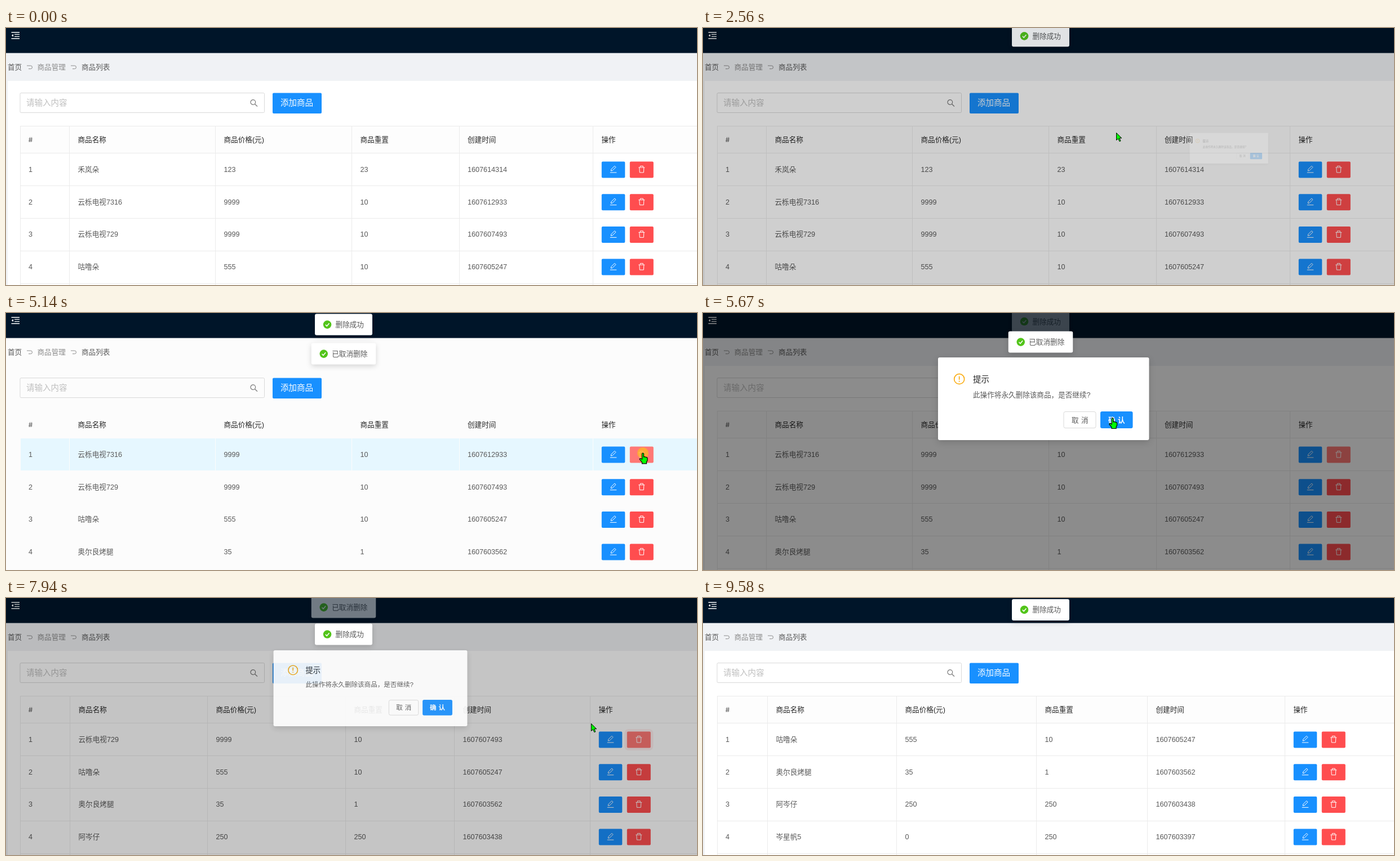
Recreate the animation shown at these times as an HTML page. Size 1226 by 457 pixels, loop 9.7 s.

```html
<!DOCTYPE html>
<html lang="zh">
<head>
<meta charset="utf-8">
<title>商品列表</title>
<style>
html, body { margin: 0; width: 100%; height: 100%; overflow: hidden; background: #f0f2f5; }
svg { display: block; width: 1226px; height: 457px; }
text { font: 12.6px "Liberation Sans", "Noto Sans CJK SC", "Noto Sans CJK", sans-serif; fill: #595959; white-space: pre; }
.big { font-size: 14.5px; }
.dark { fill: #262626; }
.soft { fill: #8c8c8c; }
.hint { fill: #bfbfbf; }
.white { fill: #fff; }
.wide { letter-spacing: 4.3px; }
.bold { font-weight: bold; }
.line { fill: none; stroke-width: 1; }
.grid { fill: none; stroke: #ebebeb; }
.icon { fill: none; stroke: #fff; stroke-width: 1; }
.bg { fill: #f0f2f5; }
.main { fill: #fff; }
.wash .bg, .wash .main, .wash .head { fill: #fcfcfc; }
.wash .grid { stroke: #fcfcfc; }
.head { fill: #fdfdfd; }
.notice { filter: drop-shadow(0 3px 5px rgba(0,0,0,.16)); }
#modal { filter: drop-shadow(0 4px 6px rgba(0,0,0,.15)); }
</style>
</head>
<body>
<svg id="stage" viewBox="0 0 1226 457">
  <rect class="bg" width="1226" height="457"/>
  <rect width="1226" height="44.5" fill="#001529"/>
  <g stroke="#fff" stroke-width="1.4" fill="#fff">
    <path d="M9.5 7.7H24M15 11.4H24M15 15.1H24M9.5 18.8H24"/>
    <path d="M13 10.8V15.7L9.8 13.2Z" stroke="none"/>
  </g>
  <text x="3" y="73.5">首页</text>
  <text x="55.5" y="73.5" class="soft">商品管理</text>
  <text x="134" y="73.5">商品列表</text>
  <path class="line" stroke="#8c8c8c" d="M37 67H43.5a3 2.8 0 0 1 0 5.6H40M115 67H121.500a3 2.8 0 0 1 0 5.600H118"/>
  <rect class="main" x="3" y="94" width="1223" height="363"/>
  <rect x="25" y="115.500" width="433.500" height="35" rx="2" fill="none" stroke="#d9d9d9"/>
  <text x="36" y="138" class="big hint">请输入内容</text>
  <path class="line" stroke="#7a7a7a" style="stroke-width:1.2" d="M434 132a4.300 4.300 0 1 0 8.600 0a4.300 4.300 0 1 0 -8.600 0M441.500 135.200L446 139.500"/>
  <rect x="473" y="115.500" width="87" height="36.500" rx="2" fill="#1890ff"/>
  <text x="487" y="138" class="big white">添加商品</text>
  <g id="tables"></g>
  <rect id="mask" width="1226" height="457"/>
  <g id="modal">
    <rect x="417" y="79" width="374.400" height="147" rx="3" fill="#fff"/>
    <g fill="none" stroke="#faad14" stroke-width="1.700">
      <circle cx="454.700" cy="117.400" r="9"/>
      <path d="M454.700 112.400V118.800M454.700 120.600V122.400"/>
    </g>
    <text x="479" y="123" class="big dark">提示</text>
    <text x="479" y="149.700">此操作将永久删除该商品，是否继续?</text>
    <rect x="640" y="175.500" width="57" height="29" rx="3" fill="#fff" stroke="#d9d9d9"/>
    <text x="654" y="194.700" class="wide">取消</text>
    <rect x="705" y="175" width="57.500" height="30" rx="3" fill="#1890ff"/>
    <text x="719" y="194.700" class="wide white bold">确认</text>
  </g>
  <g id="notices"></g>
  <g id="cursor">
    <circle id="press" r="10" fill="#ffb428" fill-opacity=".8"/>
    <path id="arrow" fill="#0f0" stroke="#000" d="M.5 .5V13.500L3.600 10.800L6 15.700L8 14.800L5.800 9.800H9.800Z"/>
    <path id="hand" fill="#0f0" stroke="#000" stroke-width="1.200" d="M-1.500 11V1.500a1.500 1.500 0 0 1 3 0V7q1.500 -1.200 2.500 .3q1.800 -.9 2.300 .7q1.700 -.5 1.700 1.300V13l-1.500 3v2.800h-8V16.500L-5.500 11.500q-.5 -2 1.200 -2z"/>
  </g>
</svg>
<script>
const LOOP = 9700;
const $ = id => document.getElementById(id);
const show = (el, on) => { el.style.display = on ? '' : 'none'; };
const ramp = (t, a, b) => Math.min(1, Math.max(0, (t - a) / (b - a)));
const mix = (a, b, p) => a + (b - a) * p;

function bezier(x1, y1, x2, y2) {
  const at = (a, b, u) => 3 * (1 - u) ** 2 * u * a + 3 * (1 - u) * u * u * b + u ** 3;
  return x => {
    let lo = 0, hi = 1;
    for (let i = 0; i < 22; i++) {
      const mid = (lo + hi) / 2;
      if (at(x1, x2, mid) < x) lo = mid; else hi = mid;
    }
    return x <= 0 ? 0 : x >= 1 ? 1 : at(y1, y2, lo);
  };
}
const outCirc = bezier(.08, .82, .17, 1);
const inOutCirc = bezier(.78, .14, .15, .86);
const smooth = bezier(.35, .1, .4, 1);

const goods = [
  ['禾岚朵', 123, 23, 1607614314],
  ['云栎电视7316', 9999, 10, 1607612933],
  ['云栎电视729', 9999, 10, 1607607493],
  ['咕噜朵', 555, 10, 1607605247],
  ['奥尔良烤腿', 35, 1, 1607603562],
  ['阿岑仔', 250, 250, 1607603438],
  ['岑星帆5', 0, 250, 1607603397]
];
const titles = ['#', '商品名称', '商品价格(元)', '商品重置', '创建时间', '操作'];
const wideCols = [25, 112.5, 371.5, 613.5, 804, 1041.5];
const layouts = [wideCols, wideCols,
  [25, 113.5, 357.5, 602.5, 795.5, 1036.5],
  [25, 114.5, 343.5, 591.5, 788.5, 1032.5]];
const listTimes = [0, 2660, 6340, 9240];

const label = (x, y, s, cls = '') => `<text x="${x}" y="${y}" class="${cls}">${s}</text>`;

function buttons(x, y, first) {
  const id = first ? 'class="del"' : '';
  return `<rect x="${x}" y="${y}" width="41.5" height="29" rx="2" fill="#1890ff"/>
    <path class="icon" d="M${x + 15} ${y + 19.5}h11.500M${x + 16.5} ${y + 16.5}l.5 -2.700l6 -6l2.200 2.200l-6 6z"/>
    ${first ? `<rect class="wave" x="${x + 50}" y="${y}" width="42" height="29" rx="3" fill="none" stroke="#ffb8b8"/>` : ''}
    <rect ${id} x="${x + 50}" y="${y}" width="42" height="29" rx="2" fill="#ff4d4f"/>
    <path class="icon" d="M${x + 65.5} ${y + 10.5}h11M${x + 68.5} ${y + 10}v-2h5v2M${x + 67} ${y + 10.5}l.5 9h7l.5 -9"/>`;
}

function table(cols, offset) {
  const tops = [223, 280.7, 338.4, 396.1];
  let s = '<rect class="head" x="25" y="175" width="1201" height="48"/>' +
    '<rect class="hover" x="25" y="223" width="1201" height="57.5" fill="#e6f7ff"/>';
  s += `<path class="grid" d="M25 174.500H1226M25 222.500H1226${tops.map(y => `M25 ${Math.round(y + 57.4) + .5}H1226`).join('')}` +
    cols.map(x => `M${Math.floor(x) + .5} 174V457`).join('') + '"/>';
  s += titles.map((h, i) => label(cols[i] + 15, 203, h, 'dark')).join('');
  tops.forEach((y, r) => {
    s += [r + 1, ...goods[r + offset]].map((v, i) => label(cols[i] + 15, y + 33, v)).join('');
    s += buttons(cols[5] + 15.3, y + 14.5, r === 0);
  });
  return `<g>${s}</g>`;
}
$('tables').innerHTML = layouts.map(table).join('');
const tables = [...$('tables').children];

// opening time, closing time, x of the click it grows from
const modals = [[1150, 2445, 1128], [3912, 4800, 1128], [5230, 6257, 1128], [7840, 9080, 1123]];
const messages = [[2500, '删除成功'], [4795, '已取消删除'], [6285, '删除成功'], [9130, '删除成功']];
$('notices').innerHTML = messages.map(([, s]) => {
  const w = 51.5 + 12.6 * s.length, x = 599 - w / 2;
  return `<g class="notice"><rect x="${x}" width="${w}" height="38" rx="3" fill="#fff"/>
    <circle cx="${x + 22}" cy="19" r="7.300" fill="#52c41a"/>
    <path class="icon" style="stroke-width:1.500" d="M${x + 18.8} 19.200l2.400 2.500l4.200 -5"/>
    ${label(x + 36.5, 23.5, s)}</g>`;
}).join('');
const notices = [...$('notices').children];

// each leg: start, end, target x, target y
const legs = [
  [550, 1000, 1128, 250], [1190, 1510, 804, 170], [1545, 1740, 733, 186],
  [2950, 3590, 1130, 250], [3930, 4050, 1030, 243, 1], [4050, 4630, 667, 190],
  [4820, 5070, 1130, 249], [5280, 5720, 722, 186], [6740, 7690, 1127, 250],
  [7850, 7940, 1038, 223, 1], [7940, 8710, 735, 186], [9180, 9560, 1232, 462]
];
const presses = [[1040, 1140], [2080, 2220], [3770, 3890], [4750, 4800], [5110, 5240], [5770, 5900], [7760, 7830], [8760, 8890]];
const hovers = [[950, 1150], [3770, 3912], [5040, 5230]];

function cursorAt(t) {
  let x = 1180, y = 470;
  for (const [a, b, tx, ty, linear] of legs) {
    if (t < a) break;
    const p = ramp(t, a, b), e = linear ? p : smooth(p);
    x = mix(x, tx, e);
    y = mix(y, ty, e);
  }
  return [x, y];
}

function drawModal(t) {
  const m = modals.find(([a, b]) => t >= a && t < b + 200);
  show($('modal'), m);
  show($('mask'), m);
  if (!m) return null;
  const [a, b, ox] = m;
  const closing = t >= b;
  const p = closing ? 1 - inOutCirc(ramp(t, b, b + 200)) : outCirc(ramp(t, a, a + 300));
  const dim = closing ? 1 - ramp(t, b, b + 200) : ramp(t, a, a + 200);
  $('mask').setAttribute('opacity', .45 * dim);
  $('modal').setAttribute('opacity', p);
  $('modal').setAttribute('transform', `translate(${ox} 250) scale(${.2 + .8 * p}) translate(${-ox} -250)`);
  return { open: a, closing };
}

function drawNotices(t) {
  let top = -5.6;
  messages.forEach(([a], i) => {
    const on = t >= a && t < a + 3300;
    show(notices[i], on);
    if (!on) return;
    const enter = outCirc(ramp(t, a, a + 200));
    const leave = inOutCirc(ramp(t, a + 3000, a + 3300));
    const pad = 7.2 * (1 - leave);
    notices[i].setAttribute('transform', `translate(0 ${top + pad - 52 * (1 - enter)})`);
    notices[i].setAttribute('opacity', enter * (1 - leave));
    top += Math.min(37.6 + 2 * pad, 135 * (1 - leave));
  });
}

function drawCursor(t, modal) {
  const [x, y] = cursorAt(t);
  const list = listTimes.filter(s => t >= s).length - 1;
  const bx = layouts[list][5] + 65;
  const overDel = !modal && x > bx && x < bx + 42 && y > 237 && y < 267;
  const overModal = modal && !modal.closing && x > 640 && x < 762 && y > 175 && y < 205;
  show($('cursor'), t >= 550 && t < 9560);
  $('cursor').setAttribute('transform', `translate(${x} ${y})`);
  show($('press'), presses.some(([a, b]) => t >= a && t < b));
  show($('hand'), overDel || overModal);
  show($('arrow'), !(overDel || overModal));
  return [list, overDel];
}

function draw(t) {
  const modal = drawModal(t);
  const [list, overDel] = drawCursor(t, modal);
  const tab = tables[list];
  tables.forEach((g, i) => show(g, i === list));
  const hot = overDel || (modal && !modal.closing);
  tab.querySelector('.del').setAttribute('fill', hot ? '#ff7875' : '#ff4d4f');
  const tint = Math.max(...hovers.map(([a, b]) => ramp(t, a, a + 100) * (1 - ramp(t, b, b + 300))));
  tab.querySelector('.hover').setAttribute('opacity', tint);
  const w = modal ? ramp(t, modal.open, modal.open + 400) : 1;
  const wave = tab.querySelector('.wave');
  wave.setAttribute('stroke-width', 11 * outCirc(w));
  wave.setAttribute('opacity', .3 * (1 - w));
  $('stage').classList.toggle('wash', t >= 5000 && t < 5230);
  drawNotices(t);
}

const start = performance.now();
function tick() {
  draw((performance.now() - start) % LOOP);
  requestAnimationFrame(tick);
}
tick();
</script>
</body>
</html>
```
